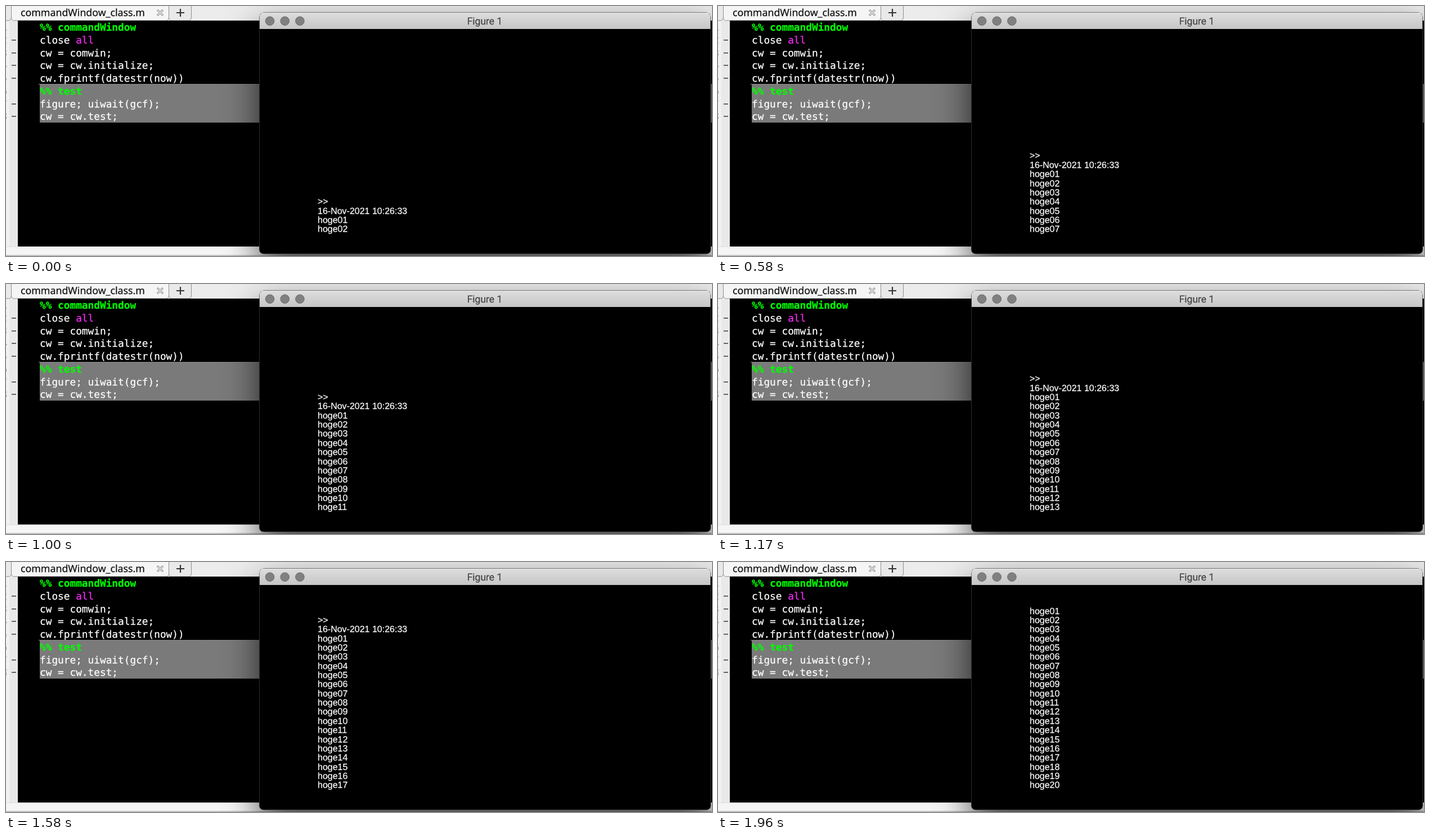
Write an HTML page with a canvas that moves like this. It is 1255 px wide and 446 px high and loops after 2 s.

```html
<!DOCTYPE html>
<html lang="en">
<head>
<meta charset="utf-8">
<title>Command window</title>
<style>
html, body { margin: 0; width: 100%; height: 100%; overflow: hidden; background: #000; }
canvas { position: absolute; left: 0; top: 0; }
</style>
</head>
<body>
<canvas id="scene" width="1255" height="446"></canvas>
<canvas id="log" width="1255" height="446"></canvas>
<script>
const W = 1255, H = 446, LOOP = 2000;
const g = document.getElementById('scene').getContext('2d');
const out = document.getElementById('log').getContext('2d');
const MONO = '17.78px "DejaVu Sans Mono", monospace';
const ROW = 22.7, BASE = 44.3;
g.textRendering = out.textRendering = 'geometricPrecision';

function rect(color, x, y, w, h) {
  g.fillStyle = color;
  g.fillRect(x, y, w, h);
}

function fade(y0, y1, top, bottom) {
  const f = g.createLinearGradient(0, y0, 0, y1);
  f.addColorStop(0, top);
  f.addColorStop(1, bottom);
  return f;
}

function line(color, width, ...pts) {
  g.strokeStyle = color;
  g.lineWidth = width;
  g.beginPath();
  for (let i = 0; i < pts.length; i += 4) {
    g.moveTo(pts[i], pts[i + 1]);
    g.lineTo(pts[i + 2], pts[i + 3]);
  }
  g.stroke();
}

// A hairline outline gives the slightly heavier smoothing of the screen.
function heavy(c, str, x, y, color) {
  c.fillStyle = c.strokeStyle = color;
  c.lineWidth = 0.25;
  c.fillText(str, x, y);
  c.strokeText(str, x, y);
}

function text(str, x, y, font, color, align = 'left') {
  g.font = font;
  g.textAlign = align;
  heavy(g, str, x, y, color);
}

function tab(x0, x1, fill) {
  g.beginPath();
  g.moveTo(x0, -2);
  g.lineTo(x0, 20);
  g.quadraticCurveTo(x0, 26, x0 + 5, 26);
  g.lineTo(x1 - 5, 26);
  g.quadraticCurveTo(x1, 26, x1, 20);
  g.lineTo(x1, -2);
  g.fillStyle = fill;
  g.fill();
  g.strokeStyle = '#8e8e8e';
  g.lineWidth = 1;
  g.stroke();
}

function drawTabs() {
  rect('#ececec', 0, 0, W, 27);
  tab(-20, 9.5, '#e9e9e9');
  tab(289.5, 329.5, '#e9e9e9');
  tab(9.5, 289.5, '#f5f5f5');
  text('commandWindow_class.m', 26, 17.5, '17.75px "Noto Sans", sans-serif', '#111');
  line('#a2a2a2', 3.6, 269, 7, 279, 17, 279, 7, 269, 17);
  line('#e8e8e8', 1.2, 270, 8, 278, 16, 278, 8, 270, 16);
  line('#333', 2.2, 303, 12, 317, 12, 310, 5, 310, 19);
}

function drawEditor() {
  rect('#000', 21, 26, W - 21, 403);
  rect('#f1f1f1', 0, 27, 6, 402);
  rect('#e9e9e9', 6, 27, 15, 402);
  rect('#7a7a7a', 60, 140, W - 60, 68);
  line('#8c8c8c', 1, 58, 139.5, W, 139.5);
  rect('#f5f5f5', 0, 429, W, 17);
  line('#dcdcdc', 1, 0, 429.5, W, 429.5);
  rect('#c4c4c4', 0, 444, W, 2);

  const code = [
    ['%% commandWindow', 1], ['close '], ['cw = comwin;'], ['cw = cw.initialize;'],
    ['cw.fprintf(datestr(now))'], ['%% test', 1], ['figure; uiwait(gcf);'], ['cw = cw.test;']
  ];
  code.forEach(([str, head], i) => {
    const y = BASE + i * ROW;
    text(str, 60, y, (head ? 'bold ' : '') + MONO, head ? '#0f0' : '#fff');
    text(i + 1, 2, y, MONO, '#777', 'right');
    if (!head) rect('#444', 10, Math.round(y - 7), 8, 1.6);
  });
  g.font = MONO;
  text('all', 60 + g.measureText('close ').width, BASE + ROW, MONO, '#f228f2');
}

function drawWindow() {
  const x = 450.5, y = 11.5, w = 802, h = 430.5;
  g.beginPath();
  g.roundRect(x, y, w, h, 8);
  g.save();
  g.shadowColor = 'rgba(0,0,0,.7)';
  g.shadowBlur = 62;
  g.shadowOffsetY = 28;
  g.fillStyle = '#000';
  g.fill();
  g.restore();

  g.save();
  g.clip();
  rect('#000', x, y, w, h);
  rect(fade(11, 41, '#dedede', '#c6c6c6'), x, y, w, 29.5);
  line('#ececec', 1, x, 12.5, x + w, 12.5);
  g.restore();
  g.strokeStyle = '#2c2c2c';
  g.lineWidth = 1;
  g.beginPath();
  g.moveTo(x, 41);
  g.lineTo(x, y + h - 8);
  g.quadraticCurveTo(x, y + h, x + 8, y + h);
  g.lineTo(x + w - 8, y + h);
  g.quadraticCurveTo(x + w, y + h, x + w, y + h - 8);
  g.lineTo(x + w, 41);
  g.stroke();

  for (const cx of [469, 495.7, 522.4]) {
    g.beginPath();
    g.arc(cx, 26.7, 7.8, 0, 7);
    g.fillStyle = '#808080';
    g.fill();
    g.strokeStyle = '#6a6a6a';
    g.stroke();
  }
  text('Figure 1', 851, 33.3, '17.5px Roboto, sans-serif', '#444', 'center');
}

// One more line is printed about every 106 ms; only the last 20 stay.
function drawLog(t) {
  const count = Math.floor(2.25 + t * 0.0094);
  const lines = ['>>', '16-Nov-2021 10:26:33'];
  for (let i = 1; i <= count; i++) lines.push('hoge' + String(i).padStart(2, '0'));
  const shown = lines.slice(-20);
  out.clearRect(0, 0, W, H);
  out.font = '16px "Liberation Sans", Arial, sans-serif';
  shown.forEach((str, i) => {
    const y = Math.round(403.2 - (shown.length - 1 - i) * 16.34);
    heavy(out, str, 554, y, '#fff');
  });
}

function frame() {
  drawLog(performance.now() % LOOP);
  requestAnimationFrame(frame);
}

drawTabs();
drawEditor();
drawWindow();
frame();
</script>
</body>
</html>
```
